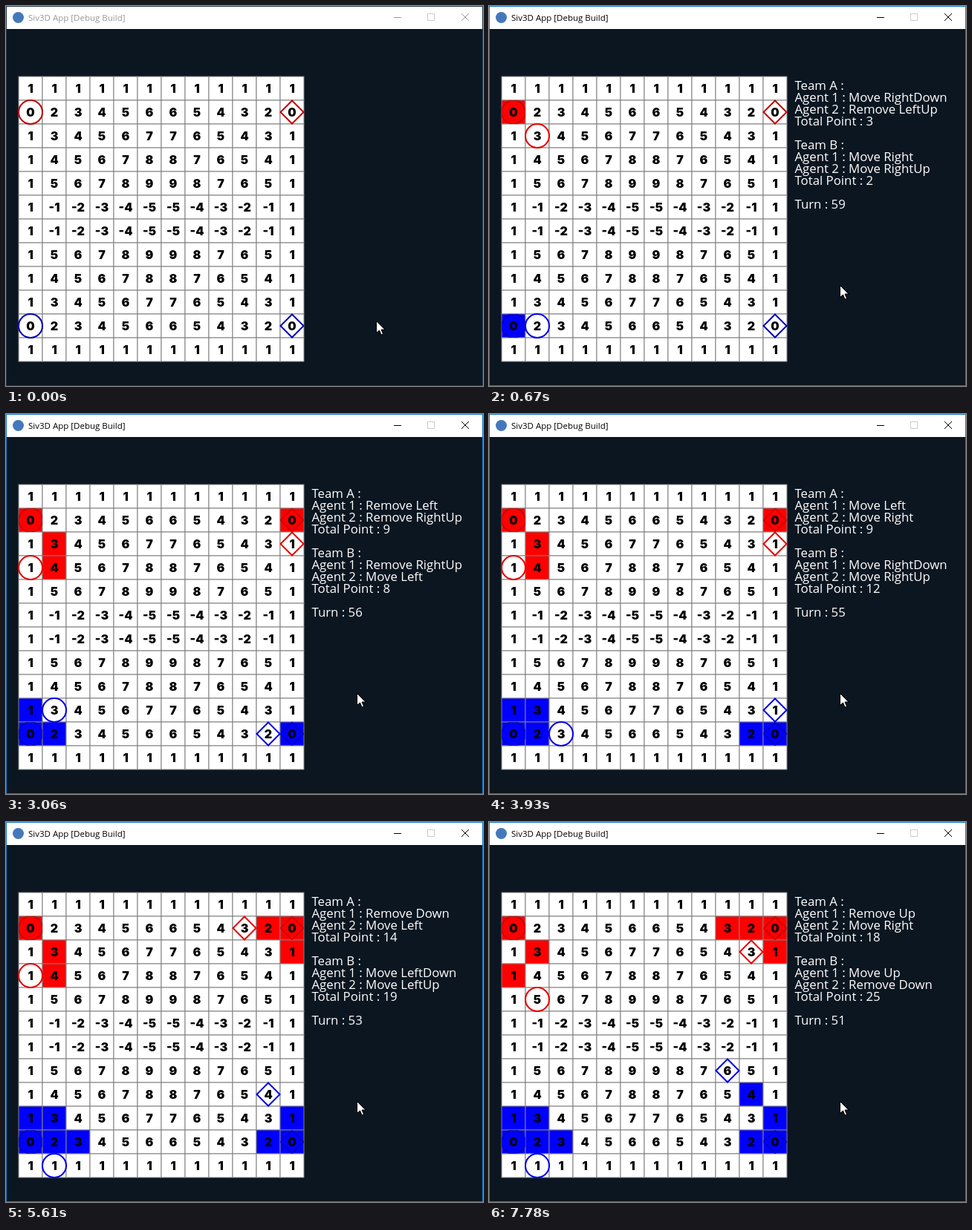
These frames come from a looping animation (642x512 px, 8000 ms). An HTML page with a canvas:

```html
<!DOCTYPE html>
<html lang="en">
<head>
<meta charset="utf-8">
<title>Siv3D App</title>
<style>
  html, body { margin: 0; width: 100%; height: 100%; overflow: hidden; background: #0b1621; }
  canvas { display: block; }
</style>
</head>
<body>
<canvas id="stage" width="642" height="512"></canvas>
<script>
const ctx = document.getElementById('stage').getContext('2d');
const LOOP = 8000, SIZE = 12, CELL = 32, LEFT = 17, TOP = 95;
const INTRO_START = 170, INTRO_STEP = 55, ACTIVATE_AT = 555;

const TEAMS = [
  { name: 'A', tile: '#ff0000', marker: '#e60000', start: '#c00000' },
  { name: 'B', tile: '#0000ff', marker: '#0000e6', start: '#0000b4' }
];
const STARTS = [[0, 1], [11, 1], [0, 10], [11, 10]];

// Start time, actions of agents A1, A2, B1, B2, then points of both teams.
const TURNS = [
  [670, 'Move RightDown', 'Remove LeftUp', 'Move Right', 'Move RightUp', 3, 2],
  [1580, 'Move Down', 'Move Right', 'Move LeftUp', 'Remove RightUp', 7, 3],
  [2190, 'Move Left', 'Move Down', 'Move Right', 'Move Right', 9, 6],
  [3060, 'Remove Left', 'Remove RightUp', 'Remove RightUp', 'Move Left', 9, 8],
  [3930, 'Move Left', 'Move Right', 'Move RightDown', 'Move RightUp', 9, 12],
  [4780, 'Move Right', 'Move LeftUp', 'Remove Down', 'Remove RightUp', 11, 12],
  [5610, 'Remove Down', 'Move Left', 'Move LeftDown', 'Move LeftUp', 14, 19],
  [6770, 'Move RightDown', 'Move RightDown', 'Move Down', 'Move LeftUp', 22, 25],
  [7780, 'Remove Up', 'Move Right', 'Move Up', 'Remove Down', 18, 25]
];

const key = (x, y) => y * SIZE + x;
const inside = (x, y) => x >= 0 && y >= 0 && x < SIZE && y < SIZE;
const centre = ([x, y]) => [LEFT + (x + .5) * CELL, TOP + (y + .5) * CELL];

function cellValue(x, y) {
  const h = Math.min(x, SIZE - 1 - x), v = Math.min(y, SIZE - 1 - y);
  if (h === 0) return v === 1 ? 0 : 1;
  if (v === 0) return 1;
  return v === 5 ? -h : h + v;
}

// Replays the first `count` turns; owned tiles block moves.
function play(count) {
  const agents = STARTS.map(p => [...p]);
  const tiles = new Map();
  for (const [, ...row] of TURNS.slice(0, count)) {
    agents.forEach((agent, i) => {
      const action = row[i];
      const x = agent[0] + action.includes('Right') - action.includes('Left');
      const y = agent[1] + action.includes('Down') - action.includes('Up');
      if (!inside(x, y)) return;
      if (action.startsWith('Remove')) {
        tiles.delete(key(x, y));
      } else if (!tiles.has(key(x, y))) {
        tiles.set(key(...agent), TEAMS[i >> 1].tile);
        agents[i] = [x, y];
      }
    });
  }
  return { agents, tiles };
}
const STATES = Array.from({ length: TURNS.length + 1 }, (_, i) => play(i));

function rect(x, y, w, h, color) {
  ctx.fillStyle = color;
  ctx.fillRect(x, y, w, h);
}

function frame(x, y, w, h, color) {
  ctx.strokeStyle = color;
  ctx.lineWidth = 1;
  ctx.strokeRect(x, y, w, h);
}

function text(string, x, y, font, color, align = 'left') {
  ctx.font = font;
  ctx.fillStyle = color;
  ctx.textAlign = align;
  ctx.fillText(string, x, y);
}

function line(points, color, width = 1, close = false) {
  ctx.beginPath();
  points.forEach(([x, y]) => ctx.lineTo(x, y));
  if (close) ctx.closePath();
  ctx.strokeStyle = color;
  ctx.lineWidth = width;
  ctx.stroke();
}

function drawMarker(cell, index, color) {
  const [x, y] = centre(cell);
  if (index % 2) {
    const r = 15.5;
    line([[x, y - r], [x + r, y], [x, y + r], [x - r, y]], color, 2, true);
  } else {
    ctx.beginPath();
    ctx.arc(x, y, 16, 0, Math.PI * 2);
    ctx.strokeStyle = color;
    ctx.lineWidth = 2;
    ctx.stroke();
  }
}

function drawBoard({ agents, tiles }) {
  for (let y = 0; y < SIZE; y++) for (let x = 0; x < SIZE; x++) {
    const px = LEFT + x * CELL, py = TOP + y * CELL;
    rect(px, py, CELL, CELL, tiles.get(key(x, y)) || '#fff');
    frame(px, py, CELL, CELL, '#808080');
  }
  // Starting places keep a darker mark, clipped to the tile once left.
  STARTS.forEach((start, i) => {
    const atStart = key(...start) === key(...agents[i]);
    ctx.save();
    if (!atStart) {
      ctx.beginPath();
      ctx.rect(LEFT + start[0] * CELL, TOP + start[1] * CELL, CELL, CELL);
      ctx.clip();
      ctx.globalAlpha = .7;
    }
    drawMarker(start, i, TEAMS[i >> 1].start);
    ctx.restore();
    if (!atStart) drawMarker(agents[i], i, TEAMS[i >> 1].marker);
  });
  for (let y = 0; y < SIZE; y++) for (let x = 0; x < SIZE; x++) {
    const [cx, cy] = centre([x, y]);
    text(cellValue(x, y), cx, cy + 6, '900 16px Inter, sans-serif', '#000', 'center');
  }
}

function drawReport(turn) {
  if (!turn) return;
  const row = TURNS[turn - 1];
  const lines = TEAMS.flatMap(({ name }, i) => [
    `Team ${name} :`,
    `Agent 1 : ${row[1 + 2 * i]}`,
    `Agent 2 : ${row[2 + 2 * i]}`,
    `Total Point : ${row[5 + i]}`,
    ''
  ]);
  lines.push(`Turn : ${60 - turn}`);
  lines.forEach((string, i) =>
    text(string, 411.5, 113 + 16 * i, '16.8px "Open Sans", sans-serif', '#fff'));
}

function drawWindow(active) {
  const ink = active ? '#000' : '#999';
  rect(0, 0, 642, 512, '#0b1621');
  rect(0, 0, 642, 31, '#fff');
  frame(.5, .5, 641, 511, active ? '#1879c8' : '#243a50');
  ctx.beginPath();
  ctx.arc(16.5, 15.5, 7.5, 0, Math.PI * 2);
  ctx.fillStyle = '#4478bd';
  ctx.fill();
  text('Siv3D App [Debug Build]', 30, 20, '11.5px "Open Sans", sans-serif', ink);
  line([[522, 15.5], [532, 15.5]], ink);
  frame(567.5, 10.5, 9, 9, '#ccc');
  line([[613, 10], [623, 20]], ink);
  line([[623, 10], [613, 20]], ink);
}

function drawCursor(t) {
  const step = Math.floor((t - INTRO_START) / INTRO_STEP) + 1;
  const p = Math.min(1, Math.max(0, step / 7));
  const eased = p * p * (3 - 2 * p);
  const x = 498.5 - 26 * eased, y = 424.5 - 48 * eased;
  const shape = [[0, 0], [0, 16], [4, 12.5], [6.5, 18.5], [9, 17.5], [6.5, 11.5], [11.5, 11.5]];
  const points = shape.map(([dx, dy]) => [x + dx, y + dy]);
  ctx.beginPath();
  points.forEach(point => ctx.lineTo(...point));
  ctx.fillStyle = '#fff';
  ctx.fill();
  line(points, '#000', 1, true);
}

function draw(t) {
  const turn = TURNS.filter(([start]) => t >= start).length;
  drawWindow(t >= ACTIVATE_AT);
  drawBoard(STATES[turn]);
  drawReport(turn);
  drawCursor(t);
}

const began = performance.now();
function tick() {
  draw((performance.now() - began) % LOOP);
  requestAnimationFrame(tick);
}
tick();
</script>
</body>
</html>
```
